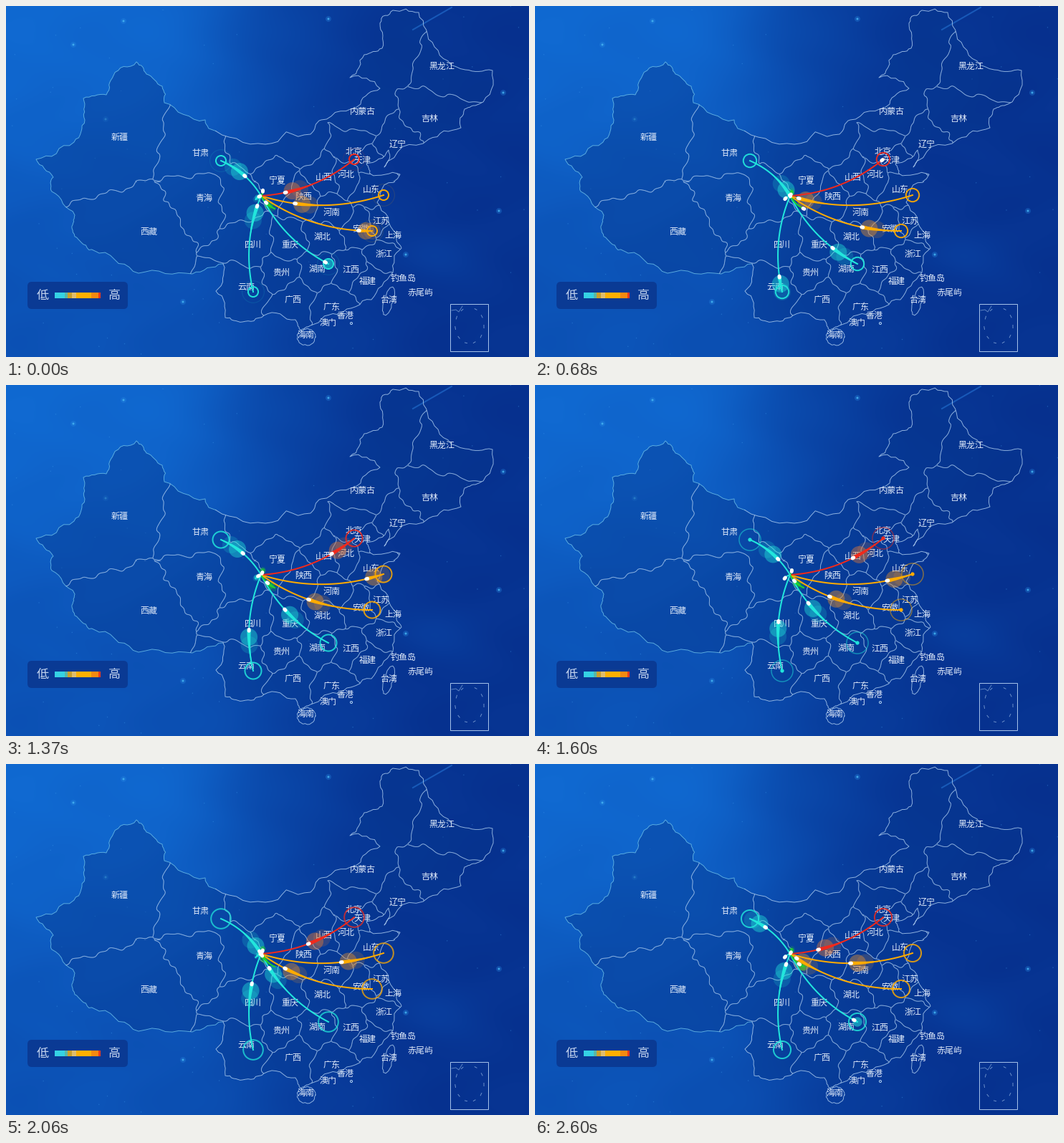
Recreate the animation shown at these times as a matplotlib script. Size 730 by 490 pixels, loop 2680 ms.

```python
import math
import random

import numpy as np
import matplotlib.pyplot as plt
from matplotlib.animation import FuncAnimation
from matplotlib.patches import Circle, FancyBboxPatch, Polygon, Rectangle

W, H, DPI = 730, 490, 100
PX = 72 / DPI
LOOP, TICK, STEPS = 2680, 20, 35
CJK = "Noto Sans CJK JP"
CYAN, ORANGE, RED, GREEN = "#22e6dc", "#ffab00", "#f02a1c", "#1fd42e"
EDGE, WEST_EDGE = "#b4d3f4", "#6fc3ec"

PROVINCES = {
    "黑龙江": (608, 85), "内蒙古": (498, 148), "吉林": (591, 158),
    "辽宁": (547, 194), "北京": (486, 204), "天津": (497, 216),
    "河北": (475, 236), "山西": (444, 240), "山东": (510, 256),
    "新疆": (159, 184), "甘肃": (271, 206), "宁夏": (378, 244),
    "陕西": (415, 266), "青海": (276, 268), "河南": (455, 288),
    "江苏": (524, 300), "安徽": (495, 311), "上海": (540, 320),
    "西藏": (199, 315), "四川": (345, 333), "重庆": (396, 333),
    "湖北": (442, 322), "浙江": (528, 346), "湖南": (435, 367),
    "江西": (482, 368), "贵州": (384, 372), "福建": (505, 384),
    "云南": (335, 392), "广西": (401, 410), "广东": (455, 420),
}
ISLANDS = {
    "钓鱼岛": (555, 380), "赤尾屿": (579, 400), "台湾": (534, 410),
    "香港": (474, 432), "澳门": (450, 442), "海南": (419, 459),
}
# long provinces reach beyond their label
ARMS = {"内蒙古": [(410, 195), (345, 195), (540, 60)], "甘肃": [(325, 265)]}

COAST = [
    (303, 360), (260, 374), (185, 373), (130, 345), (105, 330), (92, 310),
    (96, 292), (64, 259), (66, 240), (42, 215), (95, 191), (110, 160),
    (108, 130), (140, 125), (150, 98), (182, 79), (196, 96), (218, 113),
    (221, 136), (278, 160), (283, 172), (362, 194), (425, 180), (440, 160),
    (495, 138), (522, 116), (480, 101), (500, 69), (525, 60), (522, 25),
    (540, 7), (576, 10), (598, 58), (641, 90), (679, 91), (660, 138),
    (640, 145), (635, 171), (590, 187), (528, 226), (534, 202), (503, 221),
    (508, 235), (550, 236), (518, 274), (545, 318), (552, 338), (540, 372),
    (510, 410), (468, 433), (425, 446), (413, 454), (404, 438), (360, 432),
    (330, 441), (306, 435), (293, 398), (303, 360)]

rng = random.Random(8)
fig = plt.figure(figsize=(W / DPI, H / DPI), dpi=DPI)
ax = fig.add_axes([0, 0, 1, 1])


def reset_axes():
    ax.clear()
    ax.set_xlim(0, W)
    ax.set_ylim(H, 0)
    ax.axis("off")


def fade(v, edge, width):
    return 1 / (1 + np.exp((v - edge) / width))


def backdrop():
    y, x = np.mgrid[0:H, 0:W].astype(float)
    left, top = fade(x, 320, 40), fade(y, 230, 60)
    level = .07 + .22 * fade(x, 480, 45) + .27 * left + .34 * left * top
    level += .14 * np.exp(-((x - 600) / 60) ** 2 - ((y - 345) / 40) ** 2)
    level += .03 * np.sin(x / 31 + np.sin(y / 23)) * np.sin(y / 27)
    level = np.clip(level, 0, 1)[..., None]
    dark, light = np.array([6, 46, 139]), np.array([17, 111, 216])
    return (dark + (light - dark) * level) / 255


def rough(pts, amp=.17, rounds=3):
    """Roughen a polyline by repeated midpoint displacement."""
    for _ in range(rounds):
        out = [pts[0]]
        for (x0, y0), (x1, y1) in zip(pts, pts[1:]):
            k = rng.uniform(-amp, amp)
            out += [((x0 + x1) / 2 - k * (y1 - y0),
                     (y0 + y1) / 2 + k * (x1 - x0)), (x1, y1)]
        pts = out
    return pts


def stroke(pts, color=EDGE, alpha=.8):
    ax.plot(*zip(*pts), color=color, lw=.95 * PX, alpha=alpha)


def label(text, x, y, size=12, color="#e0eafa"):
    ax.text(x, y, text, fontsize=size * PX, family=CJK, color=color,
            ha="center", va="center")


def draw_country():
    shore = rough(COAST)
    land = ax.add_patch(Polygon(shore, fc="#06388f", ec="none", alpha=.42))
    west_end = next(i for i, (x, _) in enumerate(shore) if i > 20 and x > 300)
    stroke(shore[:west_end], WEST_EDGE)
    stroke(shore[west_end - 1:])
    draw_borders(land)
    for cx, cy, rx, ry, lean in [(534, 412, 7, 20, -.25), (419, 462, 13, 12, 0)]:
        a = np.linspace(0, 2 * math.pi, 14)
        dy = ry * np.sin(a)
        stroke(rough(list(zip(cx + rx * np.cos(a) + lean * dy, cy + dy)),
                     rounds=1))
    ax.add_patch(Circle((482, 443), 1.5, fill=False, ec=EDGE, lw=PX))


def draw_borders(land):
    """Each province owns the land nearest to its label."""
    y, x = np.mgrid[0:H:2, 0:W:2].astype(float)
    wx = x + 3 * np.sin(y / 6) + 1.6 * np.sin((x + y) / 3.1)
    wy = y + 3 * np.sin(x / 7) + 1.6 * np.sin((x - y) / 3.7)
    dist = np.array([
        np.min([np.hypot(wx - px, wy - py)
                for px, py in [spot, *ARMS.get(name, [])]], axis=0)
        for name, spot in PROVINCES.items()])
    first, second = np.sort(dist, axis=0)[:2]
    owner = dist.argmin(axis=0)
    for i, d in enumerate(dist):
        rival = np.where(owner == i, second, first)
        lines = ax.contour(x, y, d - rival, [0], colors=EDGE, alpha=.5,
                           linewidths=.9 * PX)
        lines.set_clip_path(land)


def draw_stars():
    for x, y in [(164, 22), (94, 55), (450, 19), (694, 122), (688, 286),
                 (247, 413), (139, 159), (558, 347)]:
        ax.add_patch(Circle((x, y), 4, fc="#2b8fe8", ec="none", alpha=.3))
        ax.add_patch(Circle((x, y), 1.5, fc="#45b4f2", ec="none", alpha=.85))
    for _ in range(60):
        ax.add_patch(Circle((rng.uniform(0, W), rng.uniform(0, H)), .7,
                            fc="#3f9cec", ec="none", alpha=.4))
    ax.plot([568, 622], [34, 3], color="#2a7fe0", lw=2 * PX, alpha=.5)


def draw_legend():
    ax.add_patch(FancyBboxPatch((36, 391), 128, 26, fc="#0a3a94", ec="none",
                                boxstyle="round,pad=6,rounding_size=6"))
    label("低", 51, 404, 17, "#c3d3ee")
    label("高", 151, 404, 17, "#c3d3ee")
    x = 68
    for width, color in [(14, "#35d2e4"), (4, "#58b8a8"), (6, "#c9a02c"),
                         (6, "#e0bd6c"), (21, "#ffb000"), (10, "#f58a10"),
                         (3, "#ee3a1c")]:
        ax.add_patch(Rectangle((x, 400), width, 8, fc=color, ec="none"))
        x += width


def draw_inset():
    ax.add_patch(Rectangle((620, 416), 53, 66, fc="none", ec="#a3c0e8", lw=PX))
    for a in np.linspace(-1.2, 4.1, 10):
        x, y = 647 + 20 * math.cos(a), 446 + 25 * math.sin(a)
        stroke([(x, y), (x - 3 * math.sin(a), y + 4 * math.cos(a))], alpha=.6)
    stroke([(622, 425), (628, 424), (632, 427), (637, 419)], alpha=.5)


def bake_map():
    reset_axes()
    ax.imshow(backdrop(), extent=(0, W, H, 0), aspect="auto")
    draw_stars()
    draw_country()
    for name, spot in {**PROVINCES, **ISLANDS}.items():
        label(name, *spot)
    draw_legend()
    draw_inset()
    fig.canvas.draw()
    picture = np.array(fig.canvas.buffer_rgba())
    reset_axes()
    ax.imshow(picture, extent=(0, W, H, 0), aspect="auto",
              interpolation="nearest")


class Flight:
    """A curved route with a comet running along it."""

    PACE = 51.6  # pixels per second
    BEND = .16

    def __init__(self, start, end, color, phase, rate=None, tail=40, glow=12,
                 haze=None):
        a, c = np.array(start, float), np.array(end, float)
        dx, dy = c - a
        self.ctrl = a, (a + c) / 2 + self.BEND * np.array([dy, -dx]), c
        self.length = math.hypot(dx, dy)
        self.phase, self.rate = phase, rate or self.PACE / self.length
        self.tail, self.glow = tail, glow
        ax.plot(*self.at(np.linspace(0, 1, 60)).T, color=color, lw=2 * PX,
                zorder=3)
        self.hazes = [ax.add_patch(Circle(start, 1, fc=haze or color, ec="none",
                                          alpha=alpha, zorder=2))
                      for alpha in (.42, .18)]
        self.body = ax.add_patch(Polygon([start] * 3, fc=color, ec="none",
                                         zorder=4))
        self.head, = ax.plot([], [], color="white", lw=5 * PX, zorder=6,
                             solid_capstyle="round")

    def at(self, u):
        u = np.asarray(u, float)[..., None]
        a, b, c = self.ctrl
        return (1 - u) ** 2 * a + 2 * u * (1 - u) * b + u * u * c

    def update(self, t):
        u = (self.phase + self.rate * t) % 1
        gone = u * self.length
        reach = min(self.tail, gone)
        spine = self.at(np.linspace(u - reach / self.length, u, 14))
        along = np.gradient(spine, axis=0)
        along /= np.hypot(*along.T)[:, None] + 1e-9
        side = along[:, ::-1] * [-1, 1]
        half = np.linspace(.6, 2.8, 14)[:, None]
        self.body.set_xy(np.vstack([spine + side * half,
                                    (spine - side * half)[::-1]]))
        radius = min(self.glow, 1.3 * gone)
        for haze, lag in zip(self.hazes, (.8, 1.7)):
            haze.center = self.at(max(0, u - lag * radius / self.length))
            haze.set_radius(radius)
        tip = self.at(u)
        self.head.set_data(*np.array([tip - along[-1], tip + along[-1]]).T)


class Ripple:
    """Rings that keep growing and fading around a city."""

    def __init__(self, center, color):
        self.rings = [ax.add_patch(Circle(center, 1, fill=False, ec=color,
                                          lw=2 * PX, zorder=5))
                      for _ in range(2)]

    def update(self, t):
        p = (.44 + 1.66 * t) % 1
        fresh, old = self.rings
        fresh.set_radius(max(1, 16 * p))
        fresh.set_alpha(1 - .4 * p ** 3)
        old.set_radius(15 + .8 * p)
        old.set_alpha(max(0, .6 * (1 - p / .55)))
        old.set_linewidth((1.6 - p) * PX)


bake_map()
HUB = (356, 265)
ROUTES = [((300, 216), CYAN, .525), ((345, 399), CYAN, .89),
          ((450, 360), CYAN, .035), ((511, 314), ORANGE, .11),
          ((527, 264), ORANGE, .722), ((486, 214), RED, .76)]
HAZE = {ORANGE: "#e8902c", RED: "#e87a34"}

actors = [Flight(city, HUB, color, phase, haze=HAZE.get(color))
          for city, color, phase in ROUTES]
actors += [Flight((375, 283), HUB, GREEN, .55, .66, 12, 6),
           Flight((358.5, 258), HUB, GREEN, .03, 2.6, 6, 4),
           Flight((348.5, 270), HUB, CYAN, .76, 2.05, 8, 4)]
actors += [Ripple(city, color) for city, color, _ in ROUTES]


def update(i):
    # the picture advances in even steps, slower than the clock
    step = math.floor(((i + .5) * TICK + 9) * STEPS / LOOP) % STEPS
    t = max(0, step * LOOP / STEPS - 5) / 1000
    for actor in actors:
        actor.update(t)
    return []


anim = FuncAnimation(fig, update, frames=LOOP // TICK, interval=TICK,
                     init_func=lambda: update(0), repeat=True, repeat_delay=0,
                     blit=False)
plt.show()
```
